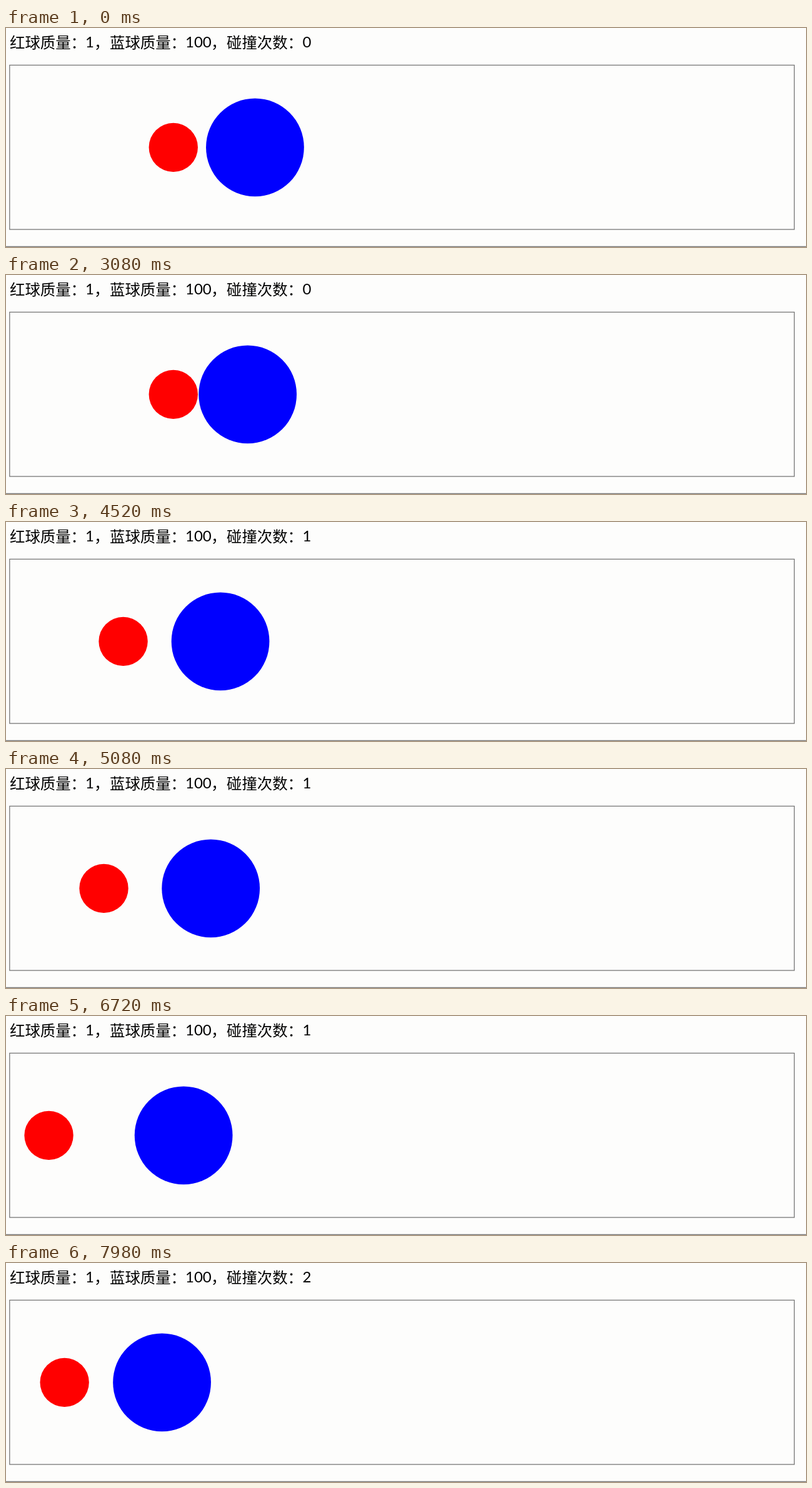
An HTML page with a canvas for the animation above (8000 ms loop, 1280 by 350 pixels).

```html
<!DOCTYPE html>
<html lang="zh-CN">
<head>
<meta charset="utf-8">
<style>
html, body { margin: 0; width: 100%; height: 100%; overflow: hidden; background: #fdfdfc; }
canvas { display: block; }
</style>
</head>
<body>
<canvas id="stage" width="1280" height="350"></canvas>
<script>
const ctx = document.getElementById('stage').getContext('2d');
const LOOP = 8000;
const SCALE = 1.3066;
const ORIGIN = { x: 6.45, y: 60 };
const MASS = { red: 1, blue: 100 };
const CONTACT = 12;   // steps until the balls meet
const WALL = 30.4;    // centre of the red ball at the wall

// Elastic collision of the moving blue ball with the resting red one
const total = MASS.red + MASS.blue;
const redSpeed = 2 * MASS.blue / total;
const blueSpeed = (MASS.blue - MASS.red) / total;

// Three ticks come 20 ms apart, then the picture rests
function tickAt(t) {
  const group = Math.floor((t - 2800) / 140);
  const rest = t - 2800 - group * 140;
  return group * 3 + Math.min(2, Math.floor(rest / 20));
}

// Slow start, short catch-up, then one step per tick
function stepsAt(tick) {
  if (tick <= 6) return Math.max(0, (tick + 12) / 2);
  return Math.min(9 + 1.5 * (tick - 6), tick + 5);
}

function stateAt(t) {
  const steps = stepsAt(tickAt(t));
  const after = Math.max(0, steps - CONTACT);
  const free = 200 - redSpeed * after;
  return {
    red: WALL + Math.abs(free - WALL),
    blue: 300 - Math.min(steps, CONTACT) - blueSpeed * after,
    hits: (steps >= CONTACT ? 1 : 0) + (free < WALL ? 1 : 0)
  };
}

function ball(x, radius, color) {
  ctx.fillStyle = color;
  ctx.beginPath();
  ctx.arc(ORIGIN.x + x * SCALE, ORIGIN.y + 100 * SCALE + 0.2, radius * SCALE, 0, Math.PI * 2);
  ctx.fill();
}

function hanzi(text, x) {
  ctx.font = '500 24.4px "Noto Sans CJK SC", "Noto Sans CJK", sans-serif';
  ctx.fillText(text, x, 32);
}

function digits(value, x) {
  ctx.font = '24px Lato, sans-serif';
  ctx.fillText(value, x, 31);
}

function caption(hits) {
  ctx.fillStyle = '#000';
  hanzi('红球质量：', 6);
  digits(MASS.red, 127);
  hanzi('，', 141);
  hanzi('蓝球质量：', 166);
  digits(MASS.blue, 287);
  hanzi('，', 328);
  hanzi('碰撞次数：', 353);
  digits(hits, 474.5);
}

function frameLines() {
  ctx.strokeStyle = '#777';
  ctx.lineWidth = 1.3;
  ctx.strokeRect(5.8, 59.4, 1255.5, 262.5);
  ctx.fillStyle = '#777';
  ctx.fillRect(0, 348.7, 1280, 1.3);
}

function draw(t) {
  const { red, blue, hits } = stateAt(t);
  ctx.fillStyle = '#fdfdfc';
  ctx.fillRect(0, 0, 1280, 350);
  caption(hits);
  frameLines();
  ball(red, 30, '#f00');
  ball(blue, 60, '#00f');
}

const start = performance.now();
function loop() {
  draw((performance.now() - start) % LOOP);
  requestAnimationFrame(loop);
}
loop();
</script>
</body>
</html>
```
